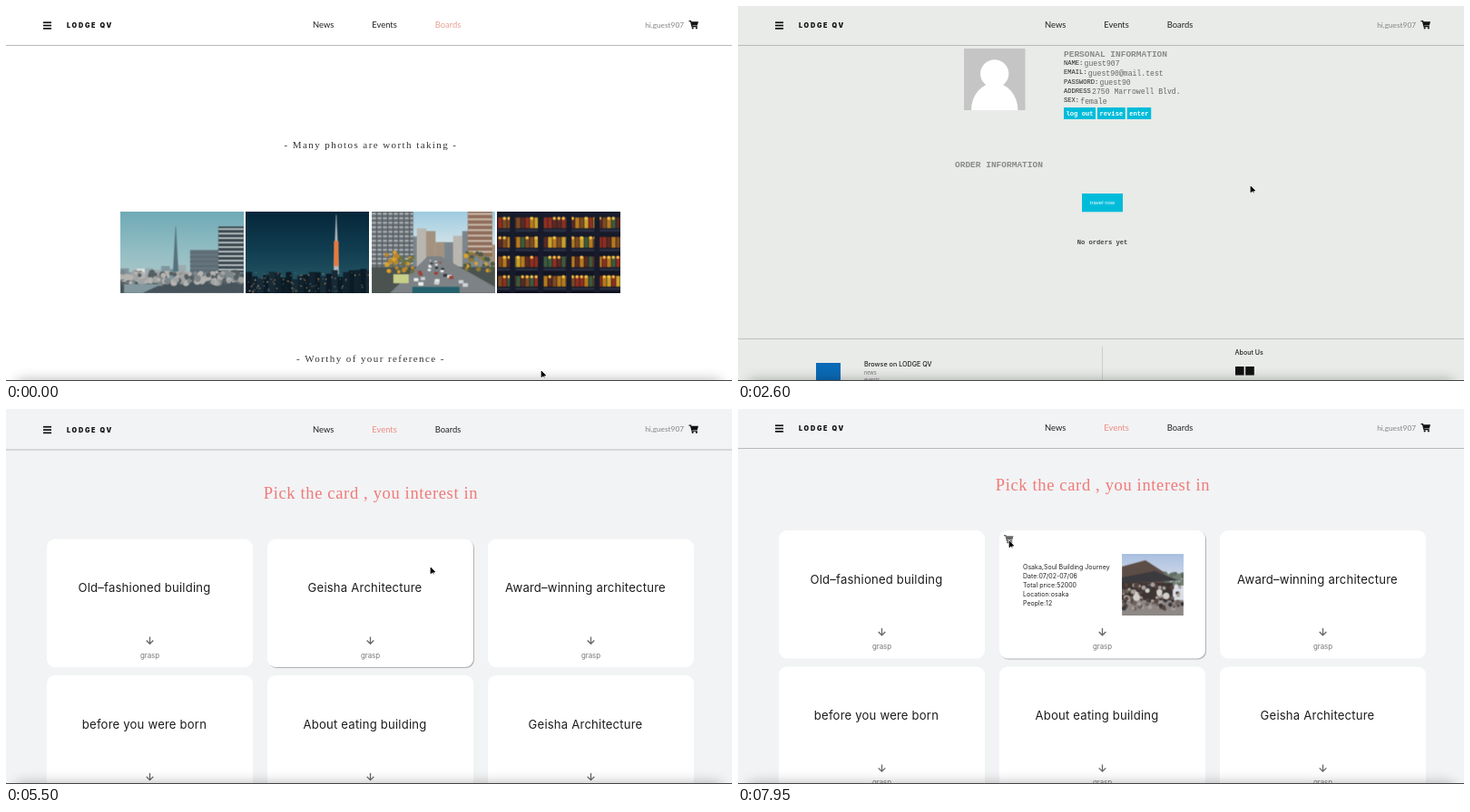
These frames come from a looping animation (800 px wide and 414 px high, 8 s). An HTML page with a canvas:

```html
<!DOCTYPE html>
<html lang="en">
<head>
<meta charset="utf-8">
<title>Site tour</title>
<style>
html, body { margin: 0; width: 100%; height: 100%; overflow: hidden; background: #fff; }
canvas { display: block; width: 800px; height: 414px; }
</style>
</head>
<body>
<canvas id="stage"></canvas>
<script>
const W = 800, H = 414, LOOP = 8000, STEP = 50;
const canvas = document.getElementById('stage');
const dpr = window.devicePixelRatio || 1;
canvas.width = W * dpr;
canvas.height = H * dpr;
const ctx = canvas.getContext('2d');

const LATO = 'Lato, sans-serif';
const INTER = 'Inter, sans-serif';
const SERIF = '"Liberation Serif", serif';
const MONO = '"Liberation Mono", monospace';
const BRAND = 'LODGE QV', USER = 'guest907';
const CYAN = '#00bcda';

// ---------- drawing helpers ----------
// Draws a line of text and returns its width.
function text(s, x, y, font, color, align = 'left', spacing = 0) {
  ctx.font = font;
  ctx.fillStyle = color;
  ctx.textAlign = align;
  ctx.letterSpacing = spacing + 'px';
  ctx.fillText(s, x, y);
  return ctx.measureText(s).width;
}

function rect(c, color, x, y, w, h) {
  c.fillStyle = color;
  c.fillRect(x, y, w, h);
}

function poly(c, color, ...p) {
  c.fillStyle = color;
  c.beginPath();
  for (let i = 0; i < p.length; i += 2) c.lineTo(p[i], p[i + 1]);
  c.fill();
}

function disc(c, color, x, y, r) {
  c.fillStyle = color;
  c.beginPath();
  c.arc(x, y, r, 0, Math.PI * 2);
  c.fill();
}

function round(color, x, y, w, h, r) {
  ctx.fillStyle = color;
  ctx.beginPath();
  ctx.roundRect(x, y, w, h, r);
  ctx.fill();
}

// ---------- motion helpers ----------
const ramp = (t, a, b) => Math.min(1, Math.max(0, (t - a) / (b - a)));
const ease = k => k * k * (3 - 2 * k);

// moves: [begin, end, value]; rests between them
function glide(t, from, moves) {
  return moves.reduce((v, [a, b, to]) => v + (to - v) * ease(ramp(t, a, b)), from);
}

// ---------- pictures ----------
function random(seed) {
  return () => (seed = (seed * 16807) % 2147483647) / 2147483647;
}

function picture(w, h, seed, sky, draw) {
  const s = document.createElement('canvas');
  s.width = w * 2;
  s.height = h * 2;
  const c = s.getContext('2d');
  c.scale(2, 2);
  const g = c.createLinearGradient(0, 0, 0, h);
  sky.forEach((color, i) => g.addColorStop(i / (sky.length - 1), color));
  rect(c, g, 0, 0, w, h);
  c.filter = 'blur(0.8px)';
  draw(c, random(seed), w, h);
  return s;
}

const pick = (list, rnd) => list[Math.floor(rnd() * list.length)];

function skyline(c, rnd, colors, y, rise, step) {
  for (let x = 0; x < 136; x += step)
    rect(c, pick(colors, rnd), x, y - rnd() * rise, step + 0.5, 91);
}

function specks(c, rnd, n, colors, x, y, w, h, size) {
  for (let i = 0; i < n; i++)
    disc(c, pick(colors, rnd), x + rnd() * w, y + rnd() * h, size * (0.5 + rnd() / 2));
}

function facade(c, wall, band, x, y, w, h, gap) {
  rect(c, wall, x, y, w, h);
  for (let v = 2; v < h; v += gap) rect(c, band, x, y + v, w, gap * 0.35);
}

function tower(c, color, x, y, h) {
  poly(c, color, x - 0.3, y, x + 0.3, y, x + 3, y + h, x - 3, y + h);
}

const river = picture(136, 91, 11, ['#6faab6', '#94bec4', '#b8cccb'], (c, rnd, w, h) => {
  skyline(c, rnd, ['#7f969e', '#9babb0', '#dfe4e4'], 68, 10, 9);
  tower(c, '#55727c', 61, 17, 50);
  facade(c, '#66757d', '#5a6972', 77, 43, 32, 28, 5);
  facade(c, '#3c4850', '#c3ccce', 108, 17, 28, 51, 5);
  rect(c, '#46535b', 0, 78, w, 13);
  specks(c, rnd, 150, ['#7f8789', '#a2a4a3', '#565f62', '#b5b4b1'], 0, 68, w, 12, 4);
  poly(c, '#82989e', 4, 81, 46, 81, 24, h, 4, h);
});

const night = picture(136, 91, 5, ['#06263a', '#123f52', '#2d5d68'], (c, rnd, w) => {
  tower(c, '#b6bec0', 99.5, 4, 66);
  rect(c, '#e8793c', 97, 33, 5, 28);
  skyline(c, rnd, ['#0b1a25', '#172a35', '#10222e'], 76, 13, 6.3);
  specks(c, rnd, 90, ['#e6c48c', '#7ea4ad', '#c98850'], 0, 68, w, 22, 0.8);
});

const street = picture(136, 91, 23, ['#9fcbe0', '#dce8ec', '#c9d0d0'], (c, rnd, w, h) => {
  skyline(c, rnd, ['#a3927f', '#7b858c', '#b9b6b0'], 38, 20, 10);
  facade(c, '#697176', '#b4b9ba', 0, 0, 46, 66, 5);
  for (let x = 5; x < 46; x += 6) rect(c, '#565f65', x, 0, 1.5, 66);
  facade(c, '#8f6e5b', '#c7b8a9', 106, 0, 27, 50, 6);
  rect(c, '#4a5350', 0, 62, w, h);
  poly(c, '#7c8285', 62, 50, 76, 50, 136, 84, 136, h, 20, h);
  specks(c, rnd, 35, ['#dda22d', '#b9872b', '#6c713e'], 16, 44, 30, 24, 2.8);
  specks(c, rnd, 30, ['#dda22d', '#8d7b36', '#4f5b45'], 102, 46, 33, 20, 2.8);
  for (let i = 0; i < 24; i++) {
    const k = i / 24, size = 2 + k * 4;
    rect(c, pick(['#eef0ef', '#2c3438', '#a33d34', '#cfd4d6'], rnd),
      68 + (rnd() - 0.5) * (10 + k * 70), 54 + k * 27, size, size * 0.7);
  }
  rect(c, '#c8d08a', 24, 70, 17, 10);
  rect(c, '#23616d', 45, 84, 52, 7);
});

const arcade = picture(136, 91, 41, ['#191d2e', '#10131f'], (c, rnd, w, h) => {
  const hues = ['#8e2f20', '#b57a1c', '#3d5a3c', '#c9a02c', '#5a2a22', '#7d4a22'];
  for (let y = 6; y < h; y += 21.6) {
    for (let x = 1; x < w; x += 5) {
      rect(c, pick(hues, rnd), x, y + 1, 4.6, 12);
      if (rnd() > 0.5) disc(c, '#f2c04a', x + 2, y + 2, 1.7);
    }
    rect(c, '#2a2f42', 0, y + 14, w, 3);
  }
  for (let x = 14; x < w; x += 31) rect(c, '#171b2b', x, 0, 6, h);
});

const oldHouse = picture(68, 68, 8, ['#a9bfe0', '#dce2ec', '#d5d6d8'], (c, rnd, w, h) => {
  specks(c, rnd, 30, ['#748075', '#5f6d63'], 46, 22, 22, 14, 4);
  poly(c, '#5d4d47', 0, 14, 26, 7, 46, 20, 48, 50, 0, 50);
  poly(c, '#3b3a3f', 0, 26, 36, 19, 62, 29, 0, 33);
  rect(c, '#3d3534', 0, 32, 56, 20);
  rect(c, '#8d8885', 0, 51, w, h);
  specks(c, rnd, 90, ['#6d625c', '#39363a', '#aaa19a', '#55433d'], 0, 34, w, 27, 3);
  specks(c, rnd, 6, ['#d3d0cb'], 10, 40, 40, 8, 4);
});

// ---------- shared parts ----------
function cart(x, y, color) {
  ctx.strokeStyle = color;
  ctx.lineWidth = 1.3;
  ctx.beginPath();
  ctx.moveTo(x, y + 0.7);
  ctx.lineTo(x + 2, y + 0.7);
  ctx.lineTo(x + 3.5, y + 6.6);
  ctx.lineTo(x + 9.2, y + 6.6);
  ctx.stroke();
  poly(ctx, color, x + 2.2, y + 1.3, x + 10.5, y + 1.3, x + 9.3, y + 5.6, x + 3.2, y + 5.6);
  disc(ctx, color, x + 4.2, y + 8.3, 1.1);
  disc(ctx, color, x + 8.4, y + 8.3, 1.1);
}

function header(bg, active, accent) {
  rect(ctx, bg, 0, -10, W, 53);
  rect(ctx, '#b9bbbb', 0, 43, W, 1);
  for (let i = 0; i < 3; i++) rect(ctx, '#111', 41, 17.4 + i * 3.3, 9, 1.7);
  text(BRAND, 67, 24.2, '900 7.2px ' + INTER, '#111', 'left', 1.75);
  let x = 338;
  for (const s of ['News', 'Events', 'Boards'])
    x += text(s, x, 24.2, '9.4px ' + LATO, s === active ? accent : '#222') + 42;
  text('hi,' + USER, 747, 23.6, '8.3px ' + LATO, '#858585', 'right');
  cart(752.5, 16, '#111');
}

function footer(y) {
  rect(ctx, '#bfc1c2', 0, y, W, 1);
  rect(ctx, '#cbcdce', 401, y + 9, 1, 65);
  rect(ctx, '#0a6ab6', 86, y + 27, 27, 27);
  text('Browse on ' + BRAND, 139, y + 31.3, '500 7.2px ' + INTER, '#222');
  ['news', 'events', 'boards'].forEach((s, i) =>
    text(s, 139, y + 40 + i * 8, '5.5px ' + INTER, '#777'));
  text('About Us', 547.5, y + 17.6, '500 7.1px ' + INTER, '#222');
  for (const x of [548, 559.2]) rect(ctx, '#111', x, y + 31, 9.6, 9.6);
  ['Culture, Soul and Architecture | Lodge qv', '© All rights reserved. Lodge qv since 2020.']
    .forEach((s, i) => text(s, 547.5, y + 52 + i * 10, '5.2px ' + INTER, '#333'));
}

// ---------- pages ----------
function boards() {
  rect(ctx, '#fff', 0, 0, W, H);
  header('#fff', 'Boards', '#e6a196');
  ['- Many photos are worth taking -', '- Worthy of your reference -'].forEach((s, i) =>
    text(s, 402, 157 + i * 235.6, '11px ' + SERIF, '#333', 'center', 1.42));
  [river, night, street, arcade].forEach((p, i) =>
    ctx.drawImage(p, 126 + i * 138.4, 226.5, 136, 90.5));
}

function profile(scroll) {
  const bg = '#e8ebe8';
  rect(ctx, bg, 0, 0, W, H);
  ctx.save();
  ctx.translate(0, -scroll);

  rect(ctx, '#c5c5c5', 249, 97.5, 67.5, 68);
  disc(ctx, '#fff', 282.7, 125.3, 15.6);
  ctx.beginPath();
  ctx.ellipse(282.7, 165.5, 25.7, 30, 0, Math.PI, 0);
  ctx.fill();

  text('PERSONAL INFORMATION', 359, 106.7, 'bold 9.5px ' + MONO, '#8a8a8a');
  const info = {
    'NAME:': USER, 'EMAIL:': 'guest90@mail.test', 'PASSWORD:': 'guest90',
    'ADDRESS': '2750 Marrowell Blvd.', 'SEX:': 'female'
  };
  Object.entries(info).forEach(([key, value], i) => {
    const y = 115.4 + i * 10.35;
    const w = text(key, 359, y, '7.1px ' + MONO, '#222');
    text(value, 360.3 + w, y + 1.5, '8.15px ' + MONO, '#666');
  });

  ctx.font = 'bold 7.1px ' + MONO;
  let x = 359;
  for (const s of ['log out', 'revise', 'enter']) {
    const w = ctx.measureText(s).width + 5.2;
    rect(ctx, CYAN, x, 162.5, w, 13);
    text(s, x + 2.6, 171.3, ctx.font, '#fff');
    x += w + 2;
  }

  text('ORDER INFORMATION', 239, 228.3, 'bold 9.5px ' + MONO, '#8a8a8a');
  rect(ctx, CYAN, 379, 257.5, 45, 20.3);
  text('travel now', 401.5, 269.8, '6px "Liberation Sans", sans-serif', '#fff', 'center');
  text('No orders yet', 401.5, 313.7, 'bold 7.15px ' + MONO, '#444', 'center');
  footer(417.5);
  ctx.restore();
  header(bg);
}

function arrow(x, y) {
  ctx.strokeStyle = '#666';
  ctx.lineWidth = 1.3;
  ctx.beginPath();
  ctx.moveTo(x, y - 4);
  ctx.lineTo(x, y + 3.6);
  ctx.moveTo(x - 3.8, y);
  ctx.lineTo(x, y + 3.8);
  ctx.lineTo(x + 3.8, y);
  ctx.stroke();
}

function details(x, y) {
  cart(x + 5, y + 5, '#666');
  ['Osaka,Soul Building Journey', 'Date:07/02-07/06', 'Total price:52000', 'Location:osaka', 'People:12']
    .forEach((s, i) => text(s, x + 26, y + 43.4 + i * 9.9, '7px ' + INTER, '#222', 'left', 0.03));
  ctx.drawImage(oldHouse, x + 135, y + 26, 68, 68);
}

function card(title, x, y, open, hover, press) {
  const mid = x + 113.5;
  if (hover) round('#b0b2b4', x + 1, y + 1, 227, 141.5, 9);
  round('#fff', x, y, 227, 141.5, 9);
  ctx.globalAlpha = 1 - open;
  text(title, mid - 6, y + 58.6, '13.1px ' + INTER, '#1c1c1c', 'center', 0.2);
  ctx.globalAlpha = open;
  if (open) details(x, y);
  ctx.globalAlpha = 1;
  arrow(mid, y + 112);
  if (press) round('#0a6af0', mid - 20.5, y + 123.3, 41, 11, 4.5);
  text('grasp', mid, y + 131, '7.9px ' + INTER, press ? '#fff' : '#777', 'center');
}

const TITLES = ['Old–fashioned building', 'Geisha Architecture', 'Award–winning architecture',
  'before you were born', 'About eating building', 'Geisha Architecture'];

function events(t, mx, my) {
  const bg = '#f2f3f5';
  const bounce = glide(t, 0, [[4950, 5050, 1.5], [5500, 5650, 0]]);
  const scroll = glide(t, 0, [[6850, 6900, 1.5], [7000, 7300, 8]]);
  const top = 142 - scroll;
  rect(ctx, bg, 0, 0, W, H);
  ctx.save();
  ctx.translate(0, bounce);
  text('Pick the card , you interest in', 402, top - 44.4, '18.5px ' + SERIF, '#f07a78', 'center', 0.65);
  if (t < 4600) {
    rect(ctx, '#fff', 0, 327, W, 100);
    footer(246);
  } else {
    const press = Math.abs(mx - 401.5) < 20.5 && Math.abs(my - top - 129) < 6;
    TITLES.forEach((s, i) => {
      const hover = i === 1;
      card(s, 45 + (i % 3) * 243, top + Math.floor(i / 3) * 150.4,
        hover ? ramp(t, 6300, 6450) : 0, hover, hover && press);
    });
  }
  header(bg, 'Events', '#f08c84');
  ctx.restore();
}

// ---------- pointer and window edge ----------
// [begin, end, x, y]
const PATH = [
  [0, 850, 746, 13], [1400, 1700, 565, 199], [2650, 2750, 543, 205],
  [3000, 3600, 146, 378], [3850, 4300, 396, 219.5], [4550, 4800, 468, 175],
  [5500, 6300, 407, 269], [7000, 7300, 398, 214], [7450, 7950, 299, 146]
];

function pointer(x, y) {
  ctx.save();
  ctx.translate(x, y);
  ctx.beginPath();
  ctx.moveTo(0, 0);
  ctx.lineTo(0, 6.8);
  ctx.lineTo(1.7, 5.2);
  ctx.lineTo(4.8, 4.9);
  ctx.closePath();
  ctx.moveTo(1.8, 4);
  ctx.lineTo(3.2, 7.4);
  ctx.lineWidth = 1.2;
  ctx.strokeStyle = '#fff';
  ctx.stroke();
  ctx.strokeStyle = ctx.fillStyle = '#000';
  ctx.lineWidth = 0.7;
  ctx.stroke();
  ctx.fill();
  ctx.restore();
}

function edge() {
  ctx.save();
  ctx.shadowColor = 'rgba(0,0,0,.3)';
  ctx.shadowBlur = 14 * dpr;
  round('#444', 12, H - 1, W - 24, 20, 4);
  ctx.restore();
  rect(ctx, '#444', 0, H - 1, W, 1);
}

function render(t) {
  ctx.setTransform(dpr, 0, 0, dpr, 0, 0);
  const mx = glide(t, 590, PATH.map(([a, b, x]) => [a, b, x]));
  const my = glide(t, 403, PATH.map(([a, b, , y]) => [a, b, y]));
  if (t >= 3900) {
    events(t, mx, my);
  } else {
    const swap = ramp(t, 1000, 1200);
    if (swap > 0) profile(glide(t, 0, [[1950, 2300, 47], [2550, 2600, 50.5], [2650, 2750, 85.5]]));
    ctx.globalAlpha = 1 - swap;
    if (swap < 1) boards();
    ctx.globalAlpha = 1;
  }
  edge();
  pointer(mx, my);
}

const start = performance.now();
function tick() {
  const t = (performance.now() - start) % LOOP;
  render(Math.floor(t / STEP) * STEP);
  requestAnimationFrame(tick);
}
tick();
</script>
</body>
</html>
```
